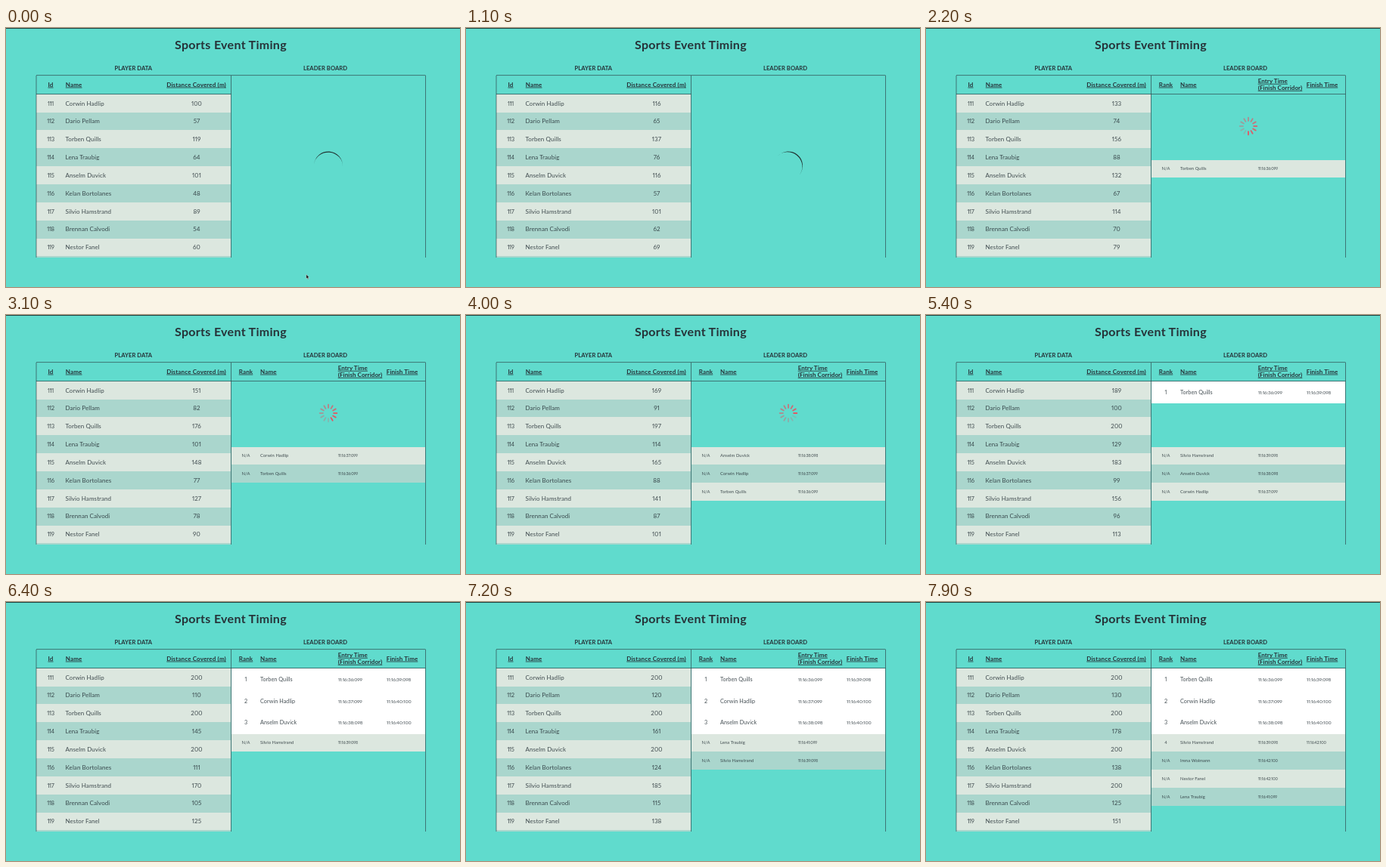
These frames come from a looping animation (600 by 343 pixels, 8 s). An HTML page:

```html
<!DOCTYPE html>
<html lang="en">
<head>
<meta charset="utf-8">
<title>Sports Event Timing</title>
<style>
  html, body { margin: 0; width: 100%; height: 100%; overflow: hidden; background: #60dbcd; }
  svg { display: block; width: 600px; height: 343px; }
  rect { shape-rendering: crispEdges; }
  text { font-family: Lato, "Open Sans", sans-serif; font-size: 8px; fill: #263238; fill-opacity: .86; letter-spacing: .08px; white-space: pre; font-variant-numeric: proportional-nums; }
  .mid { text-anchor: middle; }
  .title, .section, .head { font-weight: 700; fill-opacity: 1; }
  .title { font-size: 16px; letter-spacing: .3px; }
  .section { font-size: 7.6px; letter-spacing: .07px; }
  .head { text-decoration: underline; text-decoration-thickness: .6px; letter-spacing: .15px; }
  .tight { letter-spacing: .08px; }
  .id { font-size: 7.6px; letter-spacing: -.04em; }
  .podium { font-size: 7.2px; }
  .small { font-size: 5.8px; }
  .time { letter-spacing: -.03em; }
  .podium.time { font-size: 6.4px; }
  .small.time { font-size: 5.2px; }
  .lines { fill: none; stroke: #263238; stroke-width: .7; stroke-opacity: .85; }
  #spokes rect { shape-rendering: auto; fill: #e94f5f; }
</style>
</head>
<body>
<svg id="stage" viewBox="0 0 600 343"></svg>
<script>
const LOOP = 8000, TICKS = 9;
const ENTRY = 150, FINISH = 200;
const TOP = 87.8, ROW = 23.84, PODIUM_ROW = 28.9;
const LIGHT = "#dce7df", DARK = "#aad6cd";

// Distance at each one-second tick; the last value holds.
const players = [
  ["Corwin Hadlip", "100 116 133 151 169 189 200"],
  ["Dario Pellam", "57 65 74 82 91 100 110 120 130"],
  ["Torben Quills", "119 137 156 176 197 200"],
  ["Lena Traubig", "64 76 88 101 114 129 145 161 178"],
  ["Anselm Duvick", "101 116 132 148 165 183 200"],
  ["Kelan Bortolanes", "48 57 67 77 88 99 111 124 138"],
  ["Silvio Hamstrand", "89 101 114 127 141 156 170 185 200"],
  ["Brennan Calvodi", "54 62 70 78 87 96 105 115 125"],
  ["Nestor Fanel", "60 69 79 90 101 113 125 138 151"],
  ["Irena Wolmann", "62 71 81 91 102 114 126 139 152"]
].map(([name, list], index) => {
  const run = list.split(" ").map(Number);
  const at = k => run[Math.min(k, run.length - 1)];
  const first = limit => {
    const k = run.findIndex(d => d >= limit);
    return k < 0 ? Infinity : k;
  };
  return { name, index, at, entry: first(ENTRY), finish: first(FINISH) };
});

const millis = ["099", "099", "099", "099", "098", "098", "100", "099", "100"];
const stamp = k => `11:16:${34 + k}:${millis[k]}`;

const text = (x, y, s, cls = "") => `<text x="${x}" y="${y}" class="${cls}">${s}</text>`;
const rect = (x, y, w, h, fill) => `<rect x="${x}" y="${y}" width="${w}" height="${h}" fill="${fill}"/>`;
const stripe = i => i % 2 ? DARK : LIGHT;

function playerTable() {
  return players.map((p, i) => {
    const y = TOP + i * ROW, base = y + 14.8;
    return rect(40, y, 257, ROW, stripe(i)) +
      text(59, base, 111 + i, "mid id") + text(78.5, base, p.name);
  }).join("");
}

const distances = k => players.map((p, i) =>
  text(252, TOP + i * ROW + 14.8, p.at(k), "mid")).join("");

function boardRow(p, k, rank, base, size) {
  const done = p.finish <= k;
  return text(317, base, done ? rank : "N/A", "mid " + size) +
    text(336, base, p.name, size) +
    text(438.7, base, stamp(p.entry), size + " time") +
    (done ? text(502.8, base, stamp(p.finish), size + " time") : "");
}

function board(k) {
  const done = players.filter(p => p.finish <= k)
    .sort((a, b) => a.finish - b.finish || a.entry - b.entry);
  const open = players.filter(p => p.entry <= k && p.finish > k)
    .sort((a, b) => b.entry - a.entry || b.index - a.index);
  const podium = done.slice(0, 3).map((p, i) => {
    const y = TOP + i * PODIUM_ROW;
    return rect(298, y, 256, PODIUM_ROW, "#fff") + boardRow(p, k, i + 1, y + 16.8, "podium");
  });
  const rest = [...done.slice(3), ...open].map((p, i) => {
    const y = TOP + 3 * PODIUM_ROW + i * ROW;
    return rect(298, y, 256, ROW, stripe(i)) + boardRow(p, k, i + 4, y + 13.8, "small");
  });
  return podium.join("") + rest.join("");
}

const boardHead =
  text(317, 77.6, "Rank", "head mid") + text(336, 77.6, "Name", "head") +
  text(438.7, 72.8, "Entry Time", "head tight") +
  text(438.7, 81.8, "(Finish Corridor)", "head tight") +
  text(502.8, 77.6, "Finish Time", "head tight") +
  `<path class="lines" d="M297.5 87.5H554.5"/>`;

const spokes = Array.from({ length: 12 }, (_, i) =>
  `<rect x="-.9" y="-12.2" width="1.8" height="6" rx=".9" transform="rotate(${i * 30})"/>`).join("");

const ticks = Array.from({ length: TICKS }, (_, k) =>
  `<g class="tick">${distances(k)}${board(k)}</g>`).join("");

const stage = document.getElementById("stage");
stage.innerHTML =
  rect(0, 0, 600, 343, "#60dbcd") + rect(0, 0, 600, 1, "#20403f") +
  text(297, 27.6, "Sports Event Timing", "title mid") +
  text(168.3, 55.7, "PLAYER DATA", "section mid") +
  text(422, 55.7, "LEADER BOARD", "section mid") +
  text(59, 77.6, "Id", "head mid") + text(78.8, 77.6, "Name", "head") +
  text(251.6, 77.6, "Distance Covered (m)", "head mid") +
  `<clipPath id="view"><rect x="39" y="62" width="517" height="242"/></clipPath>
  <g clip-path="url(#view)">${playerTable()}${ticks}</g>
  <g id="head">${boardHead}</g>
  <path class="lines" d="M40 62.6H554.5M40 87.5H297.5M40 63V304M297.5 63V304M554.5 63V304"/>
  <path id="arc" fill="#20302f" d="M-19 0A19 19 0 0 1 19 0A19 17.7 0 0 0-19 0Z"/>
  <g id="spokes" transform="translate(426 130)">${spokes}</g>
  <path id="cursor" d="M396.8 326.3V332L398.1 330.9L399 333L400 332.5L399.1 330.6H400.9Z"
    fill="#111" stroke="#fff" stroke-width=".4"/>`;

const $ = id => document.getElementById(id);
const groups = [...stage.querySelectorAll(".tick")];
const blades = [...$("spokes").children];
const show = (el, on) => el.style.display = on ? "" : "none";

function draw(t) {
  const k = Math.floor(t / 1000 + .5);
  groups.forEach((g, i) => show(g, i === k));
  show($("head"), k >= 2);
  show($("arc"), k < 2);
  show($("spokes"), k >= 2 && k < 5);
  show($("cursor"), t < 500);
  $("arc").setAttribute("transform", `translate(426 182.4) rotate(${t * .36 + 4})`);
  // Each blade lights up in turn, clockwise, then fades over one second.
  const lead = t / 1000 + .33;
  blades.forEach((b, i) => {
    const age = lead - i / 12;
    b.setAttribute("opacity", 1 - .8 * (age - Math.floor(age)));
  });
}

const start = performance.now();
function frame() {
  draw((performance.now() - start) % LOOP);
  requestAnimationFrame(frame);
}
frame();
</script>
</body>
</html>
```
